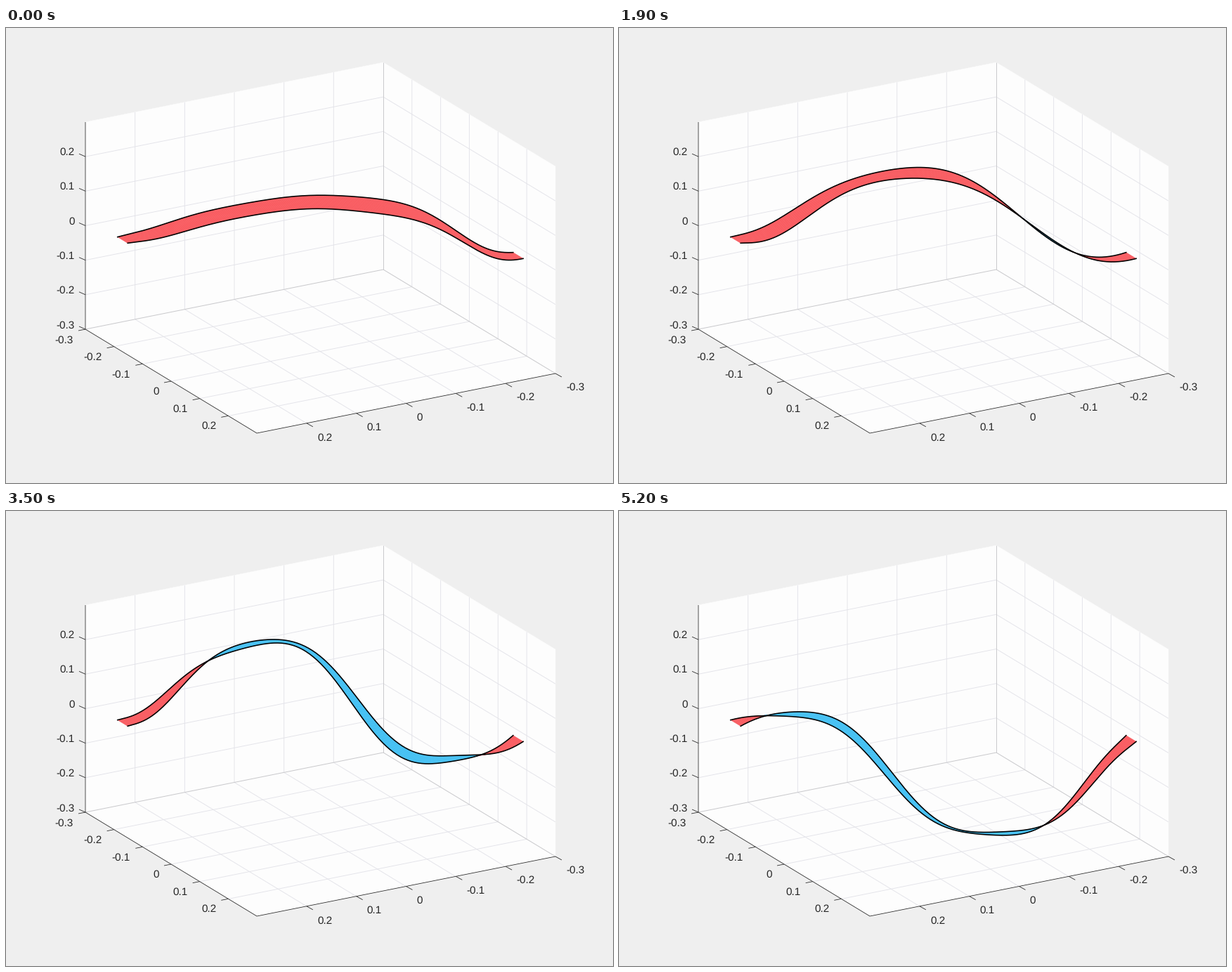
Recreate the animation shown at these times as a matplotlib script. Size 864x648 px, loop 5300 ms.

```python
import numpy as np
import matplotlib.pyplot as plt
from matplotlib.animation import FuncAnimation
from matplotlib.collections import LineCollection, PolyCollection

W, H = 864, 648
FRAMES, INTERVAL = 53, 100
RED, BLUE = "#f95c61", "#45c1f3"
INK = "#262626"

# Corners of the box, in pixels from the top left.
BACK = np.array([537, 344])
LEFT = np.array([113, 429])
RIGHT = np.array([782, 492])
FRONT = np.array([357, 577])
UP = np.array([0, -295])
CENTER = (LEFT + RIGHT + UP) / 2

# Bending shapes: seven sine modes of the height along the strip,
# then five sine modes of the tilt across it, in pixels.
BEND, TILT = 7, 5
FLAT = np.array([60.5, -11.7, -7.3, 2.2, -4.3, 1.7, -1.6,
                 -12.6, 2.8, -2, -0.9, 0])
ARCHED = np.array([106.7, 27.9, -35.1, -4.3, -2.5, -6.8, 1.1,
                   5.2, -5.8, 5.5, -6.6, -3.8])
LEANING = np.array([66.4, 55.2, -25.2, -15.4, 3.8, -1.6, -5.8,
                    16.3, -0.9, 6.7, -2.9, -4])
SAGGING = np.array([-100.1, 52.8, 18, -6.8, -3.5, -4.8, 4.6,
                    13.6, -0.3, 7.4, 1.9, -1.1])


def nudge(*modes):
    """A small change in the lowest height modes."""
    return np.pad(np.array(modes, float), (0, BEND + TILT - len(modes)))


PUSH = nudge(1, 4, -5, 1)
SETTLE = nudge(0, 4)
TIMES = np.array([0, 7, 15, 23, 35, 44, 52])
KEYS = np.array([FLAT, FLAT + 0.2 * PUSH, FLAT + PUSH, ARCHED,
                 LEANING, SAGGING, SAGGING + SETTLE])


def smooth(u):
    return u * u * (3 - 2 * u)


def tangents(times, values):
    """Monotone slopes: harmonic mean, or rest where the direction turns."""
    d = np.diff(values, axis=0) / np.diff(times)[:, None]
    prod, total = d[:-1] * d[1:], d[:-1] + d[1:]
    same = prod > 1e-9
    out = np.zeros_like(values)
    out[1:-1] = np.where(same, 2 * prod / np.where(same, total, 1), 0)
    return out


SLOPES = tangents(TIMES, KEYS)


def modes_at(frame):
    i = min(np.searchsorted(TIMES, frame, side="right") - 1, len(TIMES) - 2)
    span = TIMES[i + 1] - TIMES[i]
    u = (frame - TIMES[i]) / span
    return (KEYS[i] + smooth(u) * (KEYS[i + 1] - KEYS[i])
            + span * u * (1 - u) ** 2 * SLOPES[i]
            - span * u * u * (1 - u) * SLOPES[i + 1])


# The strip seen from above: steady along one axis, an S along the other.
S = np.linspace(0, 1, 241)
GROUND = (CENTER + np.outer(2 * S - 1, 0.466 * (RIGHT - FRONT))
          + np.outer(2 * smooth(S) - 1, 0.342 * (FRONT - LEFT)))
HALF_WIDTH = 0.0295 * (FRONT - LEFT)
SINES = np.sin(np.pi * np.outer(S, np.arange(1, BEND + 1)))


def strip_at(frame):
    modes = modes_at(frame)
    height = SINES @ modes[:BEND]
    tilt = SINES[:, :TILT] @ modes[BEND:]
    rear, front = GROUND - HALF_WIDTH, GROUND + HALF_WIDTH
    rear[:, 1] -= height - tilt / 2
    front[:, 1] -= height + tilt / 2
    return rear, front


def draw_box(ax):
    walls = [[LEFT, BACK, BACK + UP, LEFT + UP],
             [BACK, RIGHT, RIGHT + UP, BACK + UP],
             [LEFT, BACK, RIGHT, FRONT]]
    ax.add_collection(PolyCollection(walls, facecolors="#fdfdfd",
                                     edgecolors="#fdfdfd", linewidths=0.5))
    grid = []
    for k in range(1, 6):
        along = (BACK - LEFT) * k / 6
        across = (RIGHT - BACK) * k / 6
        rise = UP * k / 6
        grid += [[LEFT + along + UP, LEFT + along, FRONT + along],
                 [LEFT + across, BACK + across, BACK + across + UP],
                 [LEFT + rise, BACK + rise, RIGHT + rise]]
    ax.add_collection(LineCollection(grid, colors="#e3e3e9", linewidths=0.9))
    folds = [[LEFT, BACK, RIGHT], [BACK, BACK + UP]]
    ax.add_collection(LineCollection(folds, colors="#cacacd", linewidths=1))


def draw_axes(ax):
    lines = [[LEFT + UP, LEFT, FRONT, RIGHT]]

    def tick(point, offset):
        lines.append([point, point + np.array(offset)])

    def label(x, y, value, side):
        ax.text(x, y, f"{value / 10:g}", ha=side, va="center_baseline",
                fontsize=15.3, family="Liberation Sans", color=INK)

    for k in range(6):
        tick(LEFT + UP * k / 6, (-9, -4))
        label(98, 422 - 49.3 * k, k - 3, "right")
        tick(LEFT + (FRONT - LEFT) * k / 6, (-10, 2))
        label(95.5 + 40.8 * k, 443 + 24.5 * k, k - 3, "right")
        tick(FRONT + (RIGHT - FRONT) * (k + 1) / 6, (9, 5))
        label(443 + 70.8 * k, 582 - 14.3 * k, 2 - k, "left")
    ax.add_collection(LineCollection(lines, colors=INK, linewidths=0.8))


plt.rcParams["text.hinting"] = "none"
fig = plt.figure(figsize=(W / 72, H / 72), dpi=72, facecolor="#efefef")
ax = fig.add_axes([0, 0, 1, 1])
ax.set_xlim(0, W)
ax.set_ylim(H, 0)
ax.axis("off")
draw_box(ax)
draw_axes(ax)

faces = PolyCollection([], linewidths=0.5, zorder=4)
ax.add_collection(faces)
edges = [ax.plot([], [], color="black", lw=1.6, zorder=5)[0] for _ in range(2)]


def update(frame):
    rear, front = strip_at(frame)
    quads = np.stack([rear[:-1], rear[1:], front[1:], front[:-1]], axis=1)
    run = np.diff(rear + front, axis=0)
    gap = (front - rear)[:-1] + (front - rear)[1:]
    facing = run[:, 0] * gap[:, 1] - run[:, 1] * gap[:, 0] > 0
    colors = [RED if f else BLUE for f in facing]
    faces.set_verts(quads)
    faces.set_facecolor(colors)
    faces.set_edgecolor(colors)
    for line, edge in zip(edges, (rear, front)):
        line.set_data(edge[:, 0], edge[:, 1])
    return [faces, *edges]


anim = FuncAnimation(fig, update, frames=FRAMES, interval=INTERVAL,
                     repeat=True, repeat_delay=0, blit=False)
plt.show()
```
